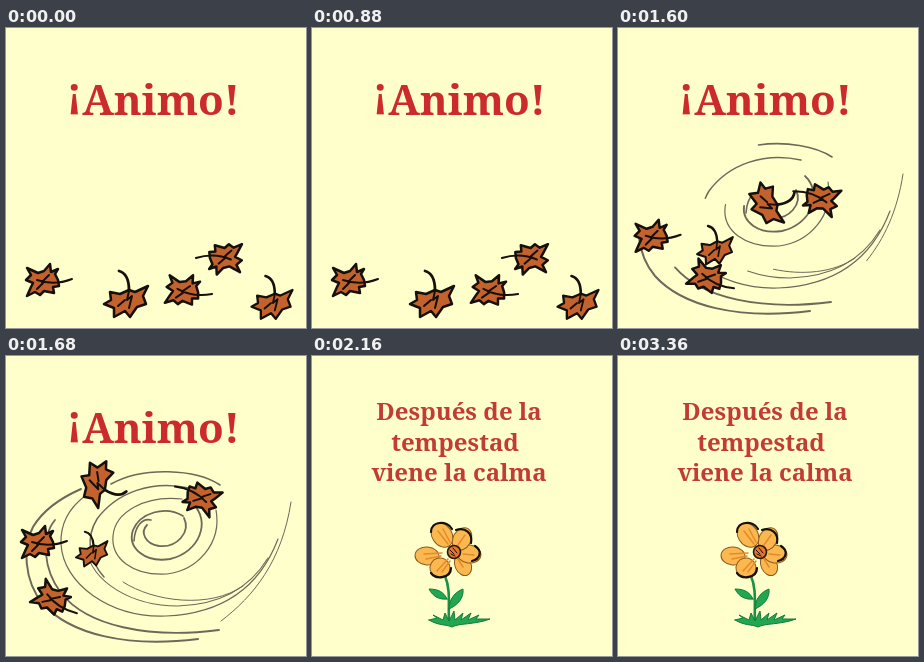
Write an HTML page that moves like this. It is 300x300 px and loops after 3520 ms.

```html
<!DOCTYPE html>
<html lang="es">
<head>
<meta charset="utf-8">
<title>¡Animo!</title>
<style>
  html, body { margin: 0; width: 100%; height: 100%; overflow: hidden; background: #ffffcc; }
  svg { display: block; width: 100vw; height: 100vh; }
  text { font-family: "Noto Serif", "DejaVu Serif", serif; font-weight: 700; text-anchor: middle; }
  path { stroke-linecap: round; stroke-linejoin: round; }
  #hello { font-size: 42px; fill: #cb2a2e; }
  #calm text { font-size: 24px; fill: #c33b38; }
  .wind { fill: none; stroke: #6e685a; }
  .ink { fill: none; stroke: #15100c; }
  .leaf { fill: #c4622d; stroke: #15100c; stroke-width: 2.5; }
  .petal { fill: #fbb84f; stroke: #8a5a20; stroke-width: 1; }
  .shade { fill: none; stroke: #e58a2c; stroke-width: 1.5; }
  .green { fill: #22a650; stroke: #137a3a; stroke-width: 1; }
  .stalk { fill: none; stroke: #1b9146; stroke-width: 2.6; }
</style>
</head>
<body>
<svg viewBox="0 0 300 300">
  <defs>
    <g id="side">
      <path class="leaf" d="M14-2L11-8 14-13 7-10 6-18 0-11-6-9-17-14-13-7-18-2-11 1-13 5-17 14-9 10-4 13 0 9 10 11 9 5 15 4Z"/>
      <path class="ink" stroke-width="2" d="M-7-2Q10 4 28-3M-2 0L5-7M-1 1L-7 7"/>
    </g>
    <g id="up">
      <path class="leaf" d="M-22 4L-15 0-16-8-6-6 3-10 9-8 22-14 17-4 20 4 11 7 4 17-1 11-12 17-12 8Z"/>
      <path class="ink" stroke-width="2.8" d="M3-10C3-20 0-27-7-29"/>
      <path class="ink" stroke-width="2" d="M3-9L1 0 6-4 3 8M-1 0L-8 6"/>
    </g>
  </defs>

  <text id="hello" x="147" y="87">
    <tspan dy="-9">¡</tspan><tspan dy="9">Animo!</tspan>
  </text>

  <g id="swirl"></g>
  <g id="tail"></g>
  <g id="leaves"></g>

  <g id="calm">
    <text x="147" y="64">Después de la</text>
    <text x="143" y="95">tempestad</text>
    <text x="147" y="125">viene la calma</text>
    <path class="stalk" d="M133 220C139 234 136 250 137 268"/>
    <path class="green" d="M137 253C137 243 143 236 151 233C152 242 146 249 137 253Z"/>
    <path class="green" d="M135 243C128 244 121 241 117 233C126 233 132 236 135 243Z"/>
    <path class="green" d="M117 264L125 262 121 259 131 264 133 257 137 265 142 255 143 264 151 257 149 264 159 257 156 264 167 259 164 263 178 263C162 269 147 267 140 271C133 268 127 270 117 264Z"/>
    <g id="petals"></g>
    <path class="ink" stroke-width="2.2" d="M119 176C119 165 135 164 140 173M144 174C153 171 161 177 159 187M163 190C171 195 168 203 160 205M139 212C139 222 124 224 119 217"/>
    <path class="shade" d="M126 175L136 188M131 173L138 186M153 179L146 189M112 198L130 197M114 203L129 200M125 215L136 203M130 216L138 205M162 199L151 198M151 211L146 203"/>
    <circle cx="142" cy="196" r="6.5" fill="#e5762a" stroke="#27170c" stroke-width="1.6"/>
    <path class="ink" stroke-width="1" d="M138 194L142 198M141 192L145 197M139 198L143 200"/>
  </g>
</svg>
<script>
const STEP = 80, LOOP = 3520, CALM_AT = 25;
const el = id => document.getElementById(id);
const add = (parent, tag, attrs) => {
  const node = document.createElementNS("http://www.w3.org/2000/svg", tag);
  for (const key in attrs) node.setAttribute(key, attrs[key]);
  return parent.appendChild(node);
};

// Wind strokes: [width, path], each starting where the gust comes in
const gusts = [
  [1, "M285 146C276 205 248 240 215 265"],
  [1.2, "M272 183C251 238 208 258 160 260C104 262 57 228 55 188C54 164 67 149 79 140"],
  [2, "M192 283C120 292 64 278 37 248C17 224 17 189 27 171C39 151 59 140 75 133"],
  [1.8, "M213 274C142 283 81 270 55 237C37 213 35 181 49 164"],
  [1.1, "M262 202C240 238 206 249 172 250C125 250 86 226 80 193"],
  [1, "M237 230C204 253 148 246 117 226"],
  [1.6, "M214 129C190 113 137 110 105 128"],
  [1.5, "M183 132C146 124 111 136 91 163C80 181 82 203 98 221"],
  [1.2, "M210 154C216 187 192 214 161 218C126 220 105 202 107 180C109 156 139 139 176 143"],
  [1.8, "M187 148C205 165 194 196 164 203C139 207 121 192 127 174C134 157 159 149 177 160"],
  [1.8, "M178 162C185 176 171 192 153 190C139 188 134 176 141 169"],
  [1.6, "M128 185C129 169 137 162 145 164"]
];
const trails = [
  [1.8, "M0 237C16 263 48 270 82 268C112 265 132 256 151 245"],
  [1.3, "M0 248C26 277 70 279 101 270C122 265 137 258 149 251"],
  [1.6, "M0 284C39 293 99 289 160 265"],
  [1.2, "M0 270C35 287 91 284 142 263"],
  [1.8, "M0 296C40 300 100 298 161 266"]
];
const drawWind = (group, list) => list.map(([width, d]) =>
  add(group, "path", { class: "wind", d, "stroke-width": width, pathLength: 1 }));
const gustPaths = drawWind(el("swirl"), gusts);
drawWind(el("tail"), trails);

// Leaf poses [x, y, turn, scale]: at rest, in the swirl, blown away
const leaves = [
  ["side", [38, 254, 0, 1], [33, 188, 0, 1], [4, 268, -25, .95]],
  ["up", [120, 272, 0, 1], [86, 197, -5, .75], [-34, 262, -70, .8]],
  ["side", [178, 264, 10, 1], [46, 244, 34, 1], [44, 261, 218, 1]],
  ["side", [218, 229, 184, 1], [195, 141, 208, 1], [88, 282, 340, 1]],
  ["up", [266, 275, 0, .93], [92, 126, 122, 1], [-30, 300, 210, 1]]
].map(([shape, ...poses]) => ({ poses, node: add(el("leaves"), "use", { href: "#" + shape }) }));

// Petals: [x, y, rx, ry, turn]
[[115, 200, 12, 9, 5], [128, 212, 10, 10, 30], [151, 209, 8, 11, -25],
 [157, 198, 12, 9, 8], [150, 183, 9, 12, 30], [130, 179, 10, 13, -32]]
  .forEach(([cx, cy, rx, ry, turn]) => add(el("petals"), "ellipse",
    { class: "petal", cx, cy, rx, ry, transform: `rotate(${turn} ${cx} ${cy})` }));

// Progress by step: 0 rest, 1 full swirl, 2 sweeping off
const progress = { 19: .33, 20: .67, 21: 1, 22: 1.5, 23: 2, 24: 2.6 };
const show = (id, on) => el(id).style.display = on ? "" : "none";

function draw(step) {
  const calm = step >= CALM_AT, k = progress[step] || 0;
  show("hello", !calm);
  show("leaves", !calm);
  show("calm", calm);
  show("swirl", k > 0 && k < 2);
  show("tail", k >= 2);

  const grown = Math.min(k, 1), away = Math.max(k - 1, 0);
  gustPaths.forEach(path => {
    path.style.strokeDasharray = grown < 1 ? `${grown} 2` : "none";
  });
  el("swirl").setAttribute("transform", `translate(${-120 * away} ${116 * away})`);
  el("tail").setAttribute("transform", `translate(${-120 * (k - 2)} ${60 * (k - 2)})`);

  const from = k > 1 ? 1 : 0;
  for (const { poses, node } of leaves) {
    const [x, y, turn, scale] = poses[from].map((v, i) => v + (poses[from + 1][i] - v) * (k - from));
    node.setAttribute("transform", `translate(${x} ${y}) rotate(${turn}) scale(${scale})`);
  }
}

const start = performance.now();
let last = -1;
function tick() {
  const step = Math.floor((performance.now() - start) % LOOP / STEP);
  if (step !== last) draw(last = step);
  requestAnimationFrame(tick);
}
tick();
</script>
</body>
</html>
```
